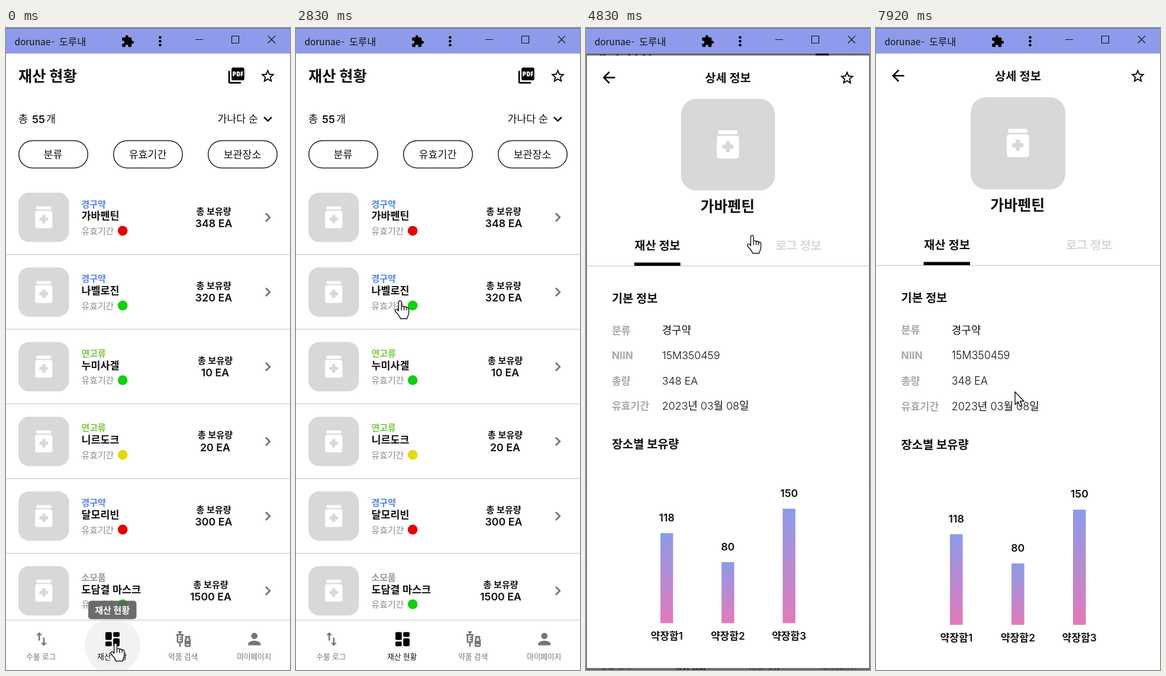
Recreate the animation shown at these times as an HTML page. Size 480 by 1080 pixels, loop 8000 ms.

```html
<!DOCTYPE html>
<html lang="ko">
<head>
<meta charset="utf-8">
<style>
html, body { margin: 0; width: 100%; height: 100%; overflow: hidden; background: #fff; }
svg { display: block; width: 100%; height: 100%; font-family: Inter, "Noto Sans CJK KR", "Noto Sans CJK", sans-serif; }
</style>
</head>
<body>
<svg id="stage" viewBox="0 0 480 1080"></svg>
<script>
const LOOP = 8000, STEP = 1000 / 12;
const OPEN_AT = 4666, OPEN_MS = 300;
const GREY = '#757575', INK = '#111', TILE = '#d8d8d8';
const RED = '#e50000', GREEN = '#10d010', YELLOW = '#e3da0a';

// ---- drawing helpers ----
const rect = (x, y, w, h, fill, r = 0, more = '') =>
  `<rect x="${x}" y="${y}" width="${w}" height="${h}" rx="${r}" fill="${fill}" ${more}/>`;
const stroke = (d, color, width) =>
  `<path d="${d}" fill="none" stroke="${color}" stroke-width="${width}"/>`;
// y is the visual middle of the line
const text = (x, y, str, size, weight = 400, color = INK, anchor = 'start') =>
  `<text x="${x}" y="${y + size * 0.37}" font-size="${size}" font-weight="${weight}" fill="${color}" text-anchor="${anchor}">${str}</text>`;
const mid = (x, y, str, size, weight, color) => text(x, y, str, size, weight, color, 'middle');
const icon = (d, x, y, s, color = '#000') =>
  `<path d="${d}" fill="${color}" fill-rule="evenodd" transform="translate(${x - 12 * s} ${y - 12 * s}) scale(${s})"/>`;
const jar = (x, y, s) => `<g transform="translate(${x} ${y}) scale(${s})">` +
  rect(-12.7, -19, 25.4, 5.2, '#fff', 1.8) + rect(-14.6, -11.8, 29.2, 29.8, '#fff', 3.5) +
  rect(-7.5, -0.3, 15, 5.6, TILE, 2.4) + rect(-2.8, -5, 5.6, 15, TILE, 2.4) + '</g>';

const ICONS = {
  puzzle: 'M20.5 11H19V7c0-1.1-.9-2-2-2h-4V3.5C13 2.12 11.88 1 10.5 1S8 2.12 8 3.5V5H4c-1.1 0-1.99.9-1.99 2v3.8H3.5c1.49 0 2.7 1.21 2.7 2.7s-1.21 2.7-2.7 2.7H2V20c0 1.1.9 2 2 2h3.8v-1.5c0-1.49 1.21-2.7 2.7-2.7 1.49 0 2.7 1.21 2.7 2.7V22H17c1.1 0 2-.9 2-2v-4h1.5c1.38 0 2.5-1.12 2.5-2.5S21.88 11 20.5 11z',
  pdf: 'M20 2H8c-1.1 0-2 .9-2 2v12c0 1.1.9 2 2 2h12c1.1 0 2-.9 2-2V4c0-1.1-.9-2-2-2zm-8.5 7.5c0 .83-.67 1.5-1.5 1.5H9v2H7.5V7H10c.83 0 1.5.67 1.5 1.5v1zm5 2c0 .83-.67 1.5-1.5 1.5h-2.5V7H15c.83 0 1.5.67 1.5 1.5v3zm4-3H19v1h1.5V11H19v2h-1.5V7h3v1.5zM9 9.5h1v-1H9v1zM4 7c0-1.3-2-1.3-2 0v13c0 1.1.9 2 2 2h13c1.3 0 1.3-2 0-2H4V7zm10 4.5h1v-3h-1v3z',
  star: 'M22 9.24l-7.19-.62L12 2 9.19 8.63 2 9.24l5.46 4.73L5.82 21 12 17.27 18.18 21l-1.63-7.03L22 9.24zM12 15.4l-3.76 2.27 1-4.28-3.32-2.88 4.38-.38L12 6.1l1.71 4.04 4.38.38-3.32 2.88 1 4.28L12 15.4z',
  back: 'M20 11H7.83l5.59-5.59L12 4l-8 8 8 8 1.41-1.41L7.83 13H20v-2z',
  swap: 'M16 17.01V10h-2v7.01h-3L15 21l4-3.99h-3zM9 3L5 6.99h3V14h2V6.99h3L9 3z',
  vaccine: 'M11 5.5H8V4h.5c.55 0 1-.45 1-1s-.45-1-1-1h-3c-.55 0-1 .45-1 1s.45 1 1 1H6v1.5H3c-.55 0-1 .45-1 1s.45 1 1 1V15c0 1.1.9 2 2 2h1v4l2 1.5V17h1c1.1 0 2-.9 2-2V7.5c.55 0 1-.45 1-1s-.45-1-1-1zM9 9H7.25c-.41 0-.75.34-.75.75s.34.75.75.75H9V12H7.25c-.41 0-.75.34-.75.75s.34.75.75.75H9V15H5V7.5h4V9zM19.5 10.5V10c.55 0 1-.45 1-1s-.45-1-1-1h-5c-.55 0-1 .45-1 1s.45 1 1 1v.5c0 .5-1.5 1.16-1.5 3V20c0 1.1.9 2 2 2h4c1.1 0 2-.9 2-2v-6.5c0-1.84-1.5-2.5-1.5-3zm-3 0V10h1v.5c0 1.6 1.5 2 1.5 3v.5h-4v-.5c0-1 1.5-1.4 1.5-3zm2.5 9.5h-4v-1.5h4V20z',
  person: 'M12 12c2.21 0 4-1.79 4-4s-1.79-4-4-4-4 1.79-4 4 1.79 4 4 4zm0 2c-2.67 0-8 1.34-8 4v2h16v-2c0-2.66-5.33-4-8-4z'
};

// ---- window bar ----
function titleBar() {
  const face = 'font-family="\'Noto Sans CJK KR\', \'Noto Sans CJK\', sans-serif"';
  return rect(0, 0, 480, 43, '#8e9bea') + rect(0, 0, 480, 1, '#606a9f') +
    `<g ${face}>` + text(14.5, 23, 'dorunae', 15.4, 300) + text(76.5, 23, '-', 15.4, 300) +
    text(90, 23, '도루내', 16.4, 300) + '</g>' +
    icon(ICONS.puzzle, 205.7, 22.5, 0.95) +
    [15.8, 22.3, 28.8].map(y => `<circle cx="260.5" cy="${y}" r="2.3"/>`).join('') +
    stroke('M320 19.5H333M381.5 13.5H393.5V25.5H381.5ZM442.7 13.2L455 25.5M455 13.2L442.7 25.5', '#111', 1.2);
}

// ---- inventory list ----
const KINDS = { 경구약: '#4c82f2', 연고류: '#78c840', 소모품: '#999' };
const ITEMS = [
  ['경구약', '가바펜틴', 348, RED, 351],
  ['경구약', '나벨로진', 320, GREEN, 351],
  ['연고류', '누미사겔', 10, GREEN, 353.5],
  ['연고류', '니르도크', 20, YELLOW, 353.5],
  ['경구약', '달모리빈', 300, RED, 351],
  ['소모품', '도담결 마스크', 1500, GREEN, 346]
];

function row([kind, name, count, color, x], i) {
  return `<g transform="translate(0 ${i * 125.65})">` +
    rect(21, 277, 85.5, 83, TILE, 18) + jar(63.8, 319, 1) +
    text(127.5, 296, kind, 15, 700, KINDS[kind]) +
    text(127.5, 316, name, 17.4, 600) +
    text(127.5, 341.5, '유효기간', 14.9, 400, '#888') +
    `<circle cx="197.2" cy="341.2" r="8.3" fill="${color}"/>` +
    mid(x, 308, '총 보유량', 15, 600) + mid(x, 328, count + ' EA', 17.8, 600) +
    stroke('M439 311.8L445.8 318.6L439 325.4', GREY, 2.8) +
    rect(0, 380.4, 480, 1.3, '#ccc') + '</g>';
}

function listPage() {
  const pills = ['분류', '유효기간', '보관장소'].map((s, i) =>
    rect(21.7 + 160 * i, 189.5, 116.6, 46, '#fff', 23, 'stroke="#222" stroke-width="1.5"') +
    mid(79.5 + 160 * i, 212.5, s, 17.3, 400));
  const tabs = ['수불 로그', '재산 현황', '약품 검색', '마이페이지'].map((s, i) =>
    mid(59.3 + 120 * i, 1057, s, 12.6, 400, i === 1 ? '#111' : GREY));
  return rect(0, 43, 480, 1037, '#fff') +
    text(21, 80.3, '재산 현황', 25.2, 700) +
    icon(ICONS.pdf, 389.3, 80, 1.35) + icon(ICONS.star, 442.5, 80.8, 1.16) +
    text(21, 153, '총', 17.3, 300) + text(44, 153, '55', 17.8, 600) + text(68, 153, '개', 17.3, 300) +
    text(357.5, 153, '가나다 순', 17.3, 300) + stroke('M436 150L442.5 156.3L449 150', '#111', 2.5) +
    pills.join('') + ITEMS.map(row).join('') +
    rect(0, 996, 480, 84, '#fff') +
    '<circle id="hover" cx="180" cy="1039" r="47" fill="#f2f2f2" clip-path="url(#nav)"/>' +
    rect(0, 995.5, 480, 1.2, '#ccc') +
    icon(ICONS.swap, 60, 1028, 1.28, GREY) +
    rect(168, 1016.2, 10.8, 13.2, '#000', 2) + rect(168, 1032, 10.8, 8, '#000', 2) +
    rect(181.2, 1016.2, 10.8, 8, '#000', 2) + rect(181.2, 1026.8, 10.8, 13.2, '#000', 2) +
    icon(ICONS.vaccine, 300.5, 1028, 1.32, GREY) + icon(ICONS.person, 419.8, 1028, 1.32, GREY) +
    tabs.join('') +
    '<g id="tip">' + rect(139, 963.5, 81.5, 31, 'rgba(97,97,97,.92)', 5) +
    mid(179.7, 979, '재산 현황', 15, 600, '#fff') + '</g>';
}

// ---- detail page ----
function detailPage() {
  const info = [['분류', '경구약'], ['NIIN', '15M350459'], ['총량', '348 EA'], ['유효기간', '2023년 03월 08일']];
  const bars = [118, 80, 150].map((n, i) => {
    const x = 135.8 + 104 * i, h = n * 1.292;
    return rect(x - 10.8, 1004 - h, 21.6, h, 'url(#bar)') +
      mid(x, 977.5 - h, n, 17.8, 600) + mid(x, 1025.5, '약장함' + (i + 1), 17.2, 600);
  });
  return rect(0, 43, 480, 1037, '#fff') +
    icon(ICONS.back, 37.3, 80.3, 1.3) + mid(240, 80.5, '상세 정보', 19.8, 600) +
    icon(ICONS.star, 442.5, 80.8, 1.16) +
    rect(160, 116.5, 160, 155, TILE, 26) + jar(239.8, 194, 1.29) +
    mid(239.3, 298, '가바펜틴', 25, 600) +
    mid(120, 364.5, '재산 정보', 19.8, 600) + mid(360, 364.5, '로그 정보', 19.8, 700, '#d8d8d8') +
    rect(0, 398.8, 480, 1.2, '#ccc') + rect(80.5, 393.5, 78.5, 5.5, '#000') +
    text(42.5, 454, '기본 정보', 19.8, 600) +
    info.map(([k, v], i) => text(42.5, 508 + 42.7 * i, k, 17.3, 700, '#a8a8a8') +
      text(127.7, 508 + 42.7 * i, v, 18, 300)).join('') +
    text(42.5, 701, '장소별 보유량', 19.8, 600) + bars.join('');
}

const HAND = 'M-2.6 2.2C-2.6-.8 2.2-.8 2.2 2.2V10.5C2.6 8.2 6.6 8.4 6.6 11C7.2 9 10.8 9.4 10.8 12C11.6 10.4 14.6 11 14.6 13.5V20C14.6 25 12 26 11.6 30H.5C0 26-4 23-8 17.5C-9.6 14.8-6 13-4 15.2L-2.6 17ZM2.2 10.5V16M6.6 11V16M10.8 12V16';
const ARROW = 'M0 0V21.5L5 17L8.5 24.5L11.8 23L8.4 15.8H15Z';

stage.innerHTML = `<defs>
  <linearGradient id="bar" x2="0" y2="1"><stop stop-color="#8b9be8"/><stop offset="1" stop-color="#e47abc"/></linearGradient>
  <clipPath id="nav"><rect y="996" width="480" height="84"/></clipPath></defs>
  <g id="list">${listPage()}</g>
  <rect id="scrim" y="43" width="480" height="1037"/>
  <g id="detail">${detailPage()}</g>
  ${titleBar()}
  <path id="cursor" fill="#fff" stroke="#111" stroke-width="1.4" stroke-linejoin="round"/>`;

// ---- motion ----
const clamp = v => Math.min(1, Math.max(0, v));
const span = (v, a, b) => clamp((v - a) / (b - a));
const $ = id => document.getElementById(id);

function bezier(x1, y1, x2, y2, x) {
  const at = (a, b, u) => 3 * (1 - u) * (1 - u) * u * a + 3 * (1 - u) * u * u * b + u * u * u;
  let lo = 0, hi = 1;
  for (let i = 0; i < 24; i++) {
    const u = (lo + hi) / 2;
    if (at(x1, x2, u) < x) lo = u; else hi = u;
  }
  return at(y1, y2, lo);
}

// slow start, quick middle, long settle
const zoomCurve = p => p < 1 / 6
  ? 0.4 * bezier(0.05, 0, 0.133, 0.06, p * 6)
  : 0.4 + 0.6 * bezier(0.208, 0.82, 0.25, 1, (p - 1 / 6) * 1.2);

const PATH = [[0, 185.3, 1035], [1900, 185.3, 1035], [2400, 176, 459], [3000, 176, 459],
  [3600, 281, 349], [6000, 281, 349], [7000, 235, 612], [LOOP, 235, 612]];

function pointer(t) {
  const i = PATH.findIndex(p => p[0] > t);
  const [t0, x0, y0] = PATH[i - 1], [t1, x1, y1] = PATH[i];
  const u = span(t, t0, t1), e = u * u * (3 - 2 * u);
  return [x0 + (x1 - x0) * e, y0 + (y1 - y0) * e];
}

const zoom = (el, s) =>
  el.setAttribute('transform', `translate(240 561.5) scale(${s}) translate(-240 -561.5)`);

function draw(t) {
  const p = span(t, OPEN_AT, OPEN_AT + OPEN_MS), z = zoomCurve(p);
  zoom($('list'), 1 + 0.05 * z);
  zoom($('detail'), 0.85 + 0.15 * z);
  $('detail').setAttribute('opacity', span(p, 0.125, 0.25));
  $('scrim').setAttribute('opacity', 0.6 * span(p, 0.2075, 0.4175));
  $('hover').setAttribute('opacity', 1 - span(t, 2020, 2150));
  $('tip').setAttribute('opacity', 1 - span(t, 2120, 2200));
  const [x, y] = pointer(t);
  $('cursor').setAttribute('d', t > OPEN_AT && y > 400 ? ARROW : HAND);
  $('cursor').setAttribute('transform', `translate(${x} ${y})`);
}

const start = performance.now();
function tick() {
  const t = (performance.now() - start) % LOOP;
  draw(Math.min(95, Math.floor((t + 5) / STEP)) * STEP);
  requestAnimationFrame(tick);
}
tick();
</script>
</body>
</html>
```
